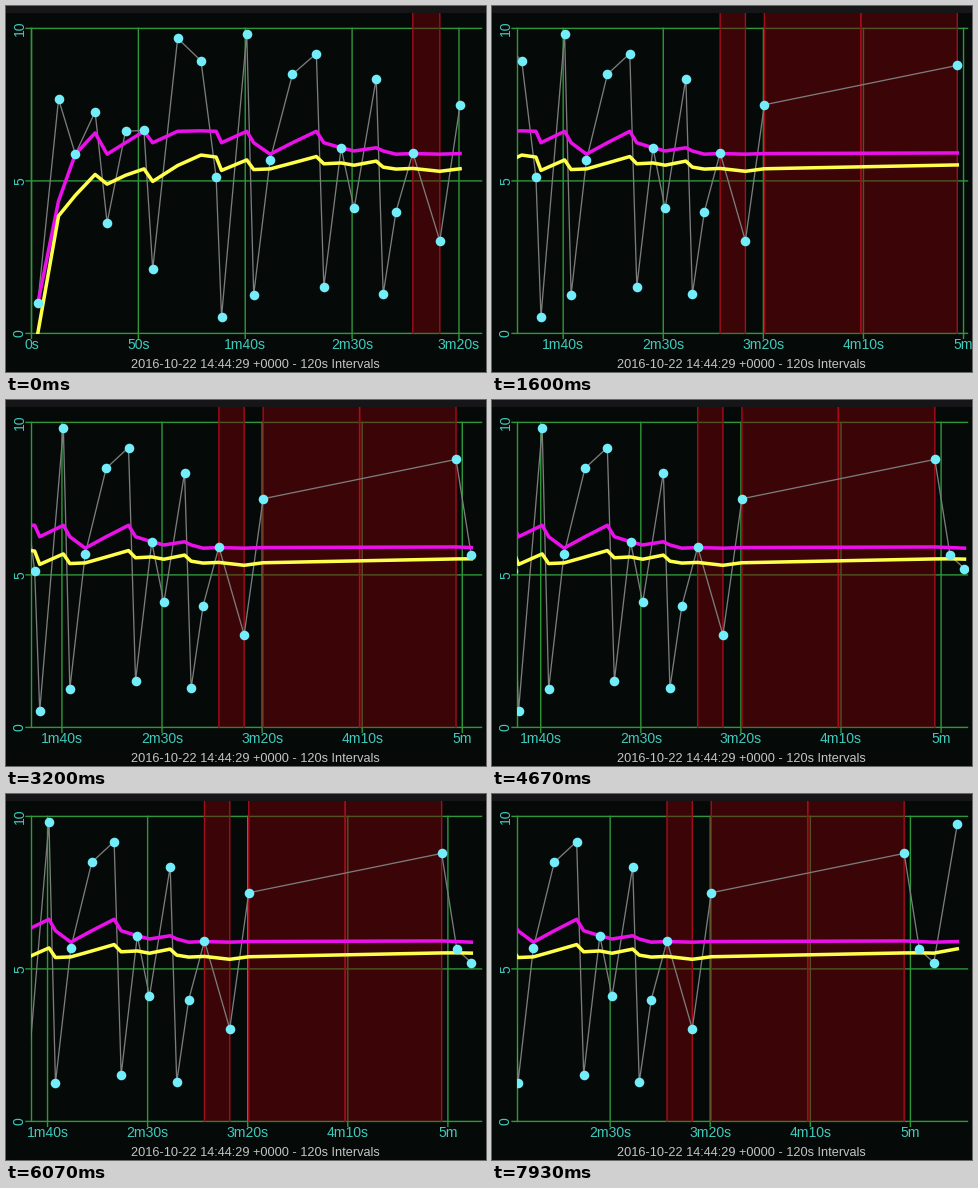
Recreate the animation shown at these times as a matplotlib script. Size 480x366 px, loop 8000 ms.

```python
import numpy as np
import matplotlib.pyplot as plt
from matplotlib.animation import FuncAnimation
from matplotlib.patches import Rectangle

W, H, DPI = 480, 366, 100
LEFT, RIGHT, TOP, BOTTOM = 25.5, 475.5, 22.4, 327.4
BAR = 7
FRAMES, STEP = 160, 50
GREEN, TEAL, RED = "#2f963a", "#3fc9ba", "#a30d1c"

values = np.array([
    0.98, 7.67, 5.86, 7.25, 3.61, 6.61, 6.64, 2.09, 9.66, 8.92,
    5.10, 0.52, 9.80, 1.25, 5.67, 8.48, 9.16, 1.51, 6.07, 4.08,
    8.34, 1.27, 3.97, 5.90, 3.02, 7.48, 8.77, 5.62, 5.19, 9.73])
count = np.arange(1, len(values) + 1)
means = (np.cumsum(values) - values[0]) / count
medians = np.array([np.median(values[:n]) for n in count])

# Each sample takes its value plus two seconds; two of them were held up.
SHORT, LONG = 24, 26
gaps = values + 2
gaps[SHORT] += 7.6
gaps[LONG] += 85.6
times = np.cumsum(gaps)

# (start, end, index of the sample that makes the band show)
middle = (times[LONG - 1] + times[LONG]) / 2
BANDS = [(times[SHORT - 1], times[SHORT], SHORT),
         (times[LONG - 1], middle, LONG),
         (middle, times[LONG], LONG)]
TICKS = range(0, 301, 50)

# Each arrival adds one sample and slides the window to it.
FIRST = LONG
ARRIVALS = [340, 2240, 4150, 6650]
SLIDE = 1000
SPAN, LAG = 224.8, 219.7
VIEWS = [(0, times[FIRST - 1] * 1.05)] + [(t - LAG, SPAN)
                                          for t in times[FIRST:]]


def px(width):
    return width * 72 / DPI


def ypos(v):
    return 326.9 - 30.5 * v


def ease(u):
    u = min(max(u, 0), 1)
    return 4 * u**3 if u < 0.5 else 1 - 4 * (1 - u)**3


def tick_name(s):
    m, s = divmod(s, 60)
    return (f"{m}m" if m else "") + (f"{s}s" if s or not m else "")


plt.rcParams["font.family"] = "Liberation Sans"
fig = plt.figure(figsize=(W / DPI, H / DPI), dpi=DPI, facecolor="#050a08")
ax = fig.add_axes([0, 0, 1, 1])
ax.set_xlim(0, W)
ax.set_ylim(H, 0)
ax.axis("off")

ax.add_patch(Rectangle((0, 0), W, BAR, fc="#161618", ec="none"))
window = Rectangle((LEFT - 0.5, BAR), RIGHT - LEFT + 0.5, BOTTOM - BAR + 1,
                   fc="none", ec="none")
ax.add_patch(window)


def line(color, width, z, clip=True, **kw):
    item, = ax.plot([], [], color=color, lw=px(width), zorder=z, snap=False,
                    solid_joinstyle="round", **kw)
    if clip:
        item.set_clip_path(window)
    return item


def rule():
    return line(GREEN, 1.4, 2, clip=False)


def label(x, y, text, size, color, **kw):
    return ax.text(x, y, text, fontsize=px(size), color=color, ha="center",
                   va="baseline", zorder=8, **kw)


for v, y in zip((0, 5, 10), np.linspace(BOTTOM, TOP, 3)):
    rule().set_data([20, RIGHT], [y, y])
    label(18, y, str(v), 14, TEAL, rotation=90, rotation_mode="anchor")
rule().set_data([LEFT, LEFT], [TOP, BOTTOM])
label(249.5, 361.5, "2016-10-22 14:44:29 +0000 - 120s Intervals", 12.75,
      "#c4c4c4")

grid = [rule() for _ in TICKS]
names = [label(0, 343, tick_name(s), 14, TEAL) for s in TICKS]

fills, edges = [], []
for _ in BANDS:
    fill = Rectangle((0, BAR), 1, BOTTOM - BAR, fc="#7e0006", alpha=0.45,
                     ec="none", zorder=3, snap=False)
    ax.add_patch(fill)
    fill.set_clip_path(window)
    fills.append(fill)
    edges.append([line(RED, 1.4, 4), line(RED, 1.4, 4)])

curves = [
    (line("#7c7c7c", 1.3, 5), values),
    (line("#ea10ea", 3.5, 6), medians),
    (line("#ffff4c", 3.5, 6), means),
    (line("none", 1, 7, marker="o", ms=px(9.6), mfc="#74edfb", mec="none"),
     values),
]


def view(ms):
    left, span = VIEWS[0]
    for start, (l0, s0), (l1, s1) in zip(ARRIVALS, VIEWS, VIEWS[1:]):
        p = ease((ms - start) / SLIDE)
        left += (l1 - l0) * p
        span += (s1 - s0) * p
    return left, span


def draw(i):
    ms = i * STEP
    n = FIRST + sum(ms >= start for start in ARRIVALS)
    left, span = view(ms)

    def xpos(t):
        return LEFT + (t - left) * (RIGHT - LEFT) / span

    for s, tick, name in zip(TICKS, grid, names):
        x = xpos(s)
        shown = LEFT <= x <= RIGHT
        tick.set_data([x, x], [TOP, BOTTOM + 5])
        tick.set_visible(shown)
        name.set_x(x)
        name.set_visible(shown)

    for (a, b, last), fill, sides in zip(BANDS, fills, edges):
        shown = n > last
        fill.set_x(xpos(a))
        fill.set_width(xpos(b) - xpos(a))
        fill.set_visible(shown)
        for t, side in zip((a, b), sides):
            side.set_data([xpos(t)] * 2, [BAR, BOTTOM])
            side.set_visible(shown)

    for item, data in curves:
        item.set_data(xpos(times[:n]), ypos(data[:n]))
    return []


anim = FuncAnimation(fig, draw, frames=FRAMES, interval=STEP,
                     init_func=lambda: draw(0), repeat=True, repeat_delay=0)
plt.show()
```
